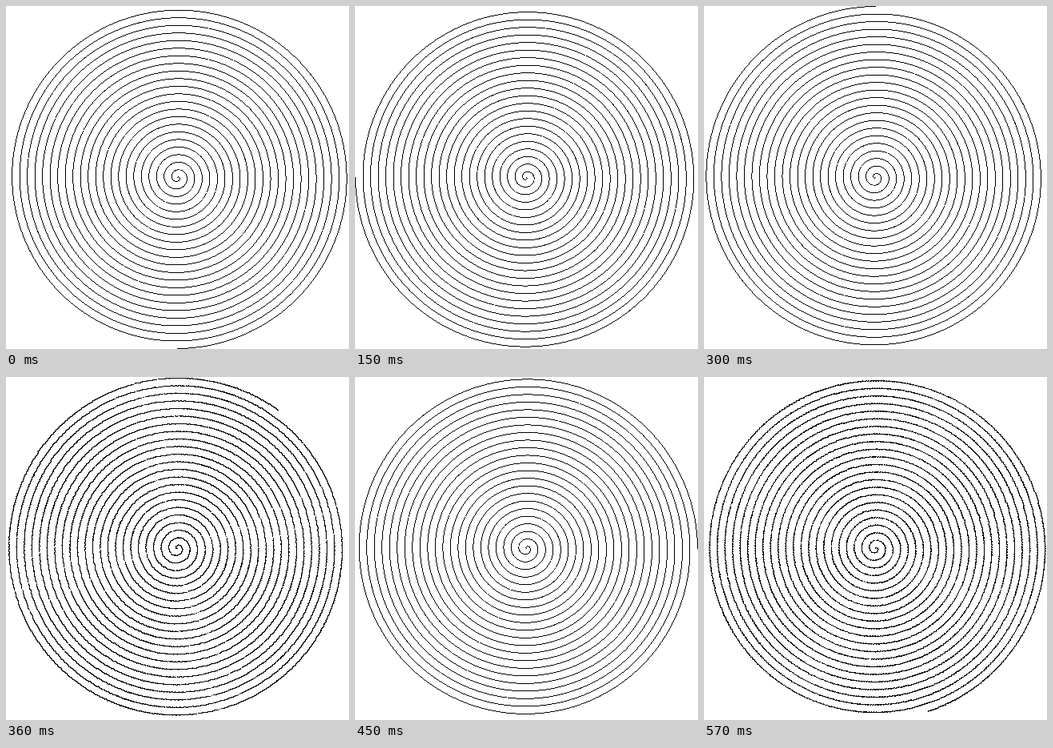
Animation of 429 by 429 pixels, one loop 600 ms. Source, as an HTML page with a canvas:

```html
<!DOCTYPE html>
<html lang="en">
<head>
<meta charset="utf-8">
<title>Turning spiral</title>
<style>
  html, body { margin: 0; width: 100%; height: 100%; overflow: hidden; background: #fff; }
  canvas { display: block; width: 429px; height: 429px; image-rendering: pixelated; }
</style>
</head>
<body>
<canvas id="stage" width="429" height="429"></canvas>
<script>
const SIZE = 429, MID = 214, STEPS = 20, STEP_MS = 30;
const TURNS = 22.5, PITCH = MID / TURNS, INK_LEVEL = 0.3;
const ctx = document.getElementById('stage').getContext('2d');

// 1 where a one-pixel, non-antialiased spiral passes; it starts upwards and widens clockwise.
function ink(x, y) {
  const r = Math.hypot(x, y);
  if (!r) return 1;
  const turn = (Math.atan2(x, -y) / (2 * Math.PI) + 1) % 1;
  const ring = Math.round(r / PITCH - turn);
  const gap = Math.abs(r - (ring + turn) * PITCH);
  const half = Math.max(Math.abs(x), Math.abs(y)) / r / 2;
  return +(ring >= 0 && ring + turn <= TURNS && gap <= half);
}

const base = Uint8Array.from({ length: SIZE * SIZE },
  (_, i) => ink(i % SIZE - MID, Math.floor(i / SIZE) - MID));
const at = (x, y) => x >= 0 && y >= 0 && x < SIZE && y < SIZE ? base[y * SIZE + x] : 0;

// Bilinear coverage at a point of the unrotated spiral.
function coverage(x, y) {
  const left = Math.floor(x), top = Math.floor(y), u = x - left, v = y - top;
  return (1 - v) * ((1 - u) * at(left, top) + u * at(left + 1, top)) +
    v * ((1 - u) * at(left, top + 1) + u * at(left + 1, top + 1));
}

// Hard thresholding leaves bold, rough edges between quarter turns.
function render(step) {
  const image = ctx.createImageData(SIZE, SIZE);
  const pixels = new Uint32Array(image.data.buffer);
  const angle = step / STEPS * 2 * Math.PI;
  const c = Math.cos(angle), s = Math.sin(angle);
  for (let i = 0; i < pixels.length; i++) {
    const x = i % SIZE - MID, y = Math.floor(i / SIZE) - MID;
    const black = coverage(MID + x * c + y * s, MID + y * c - x * s) > INK_LEVEL;
    pixels[i] = black ? 0xff000000 : 0xffffffff;
  }
  return image;
}

const frames = Array.from({ length: STEPS }, (_, step) => render(step));
const start = performance.now();

function draw(now) {
  const step = Math.floor(Math.max(0, now - start) / STEP_MS) % STEPS;
  ctx.putImageData(frames[step], 0, 0);
  requestAnimationFrame(draw);
}
draw(start);
</script>
</body>
</html>
```
